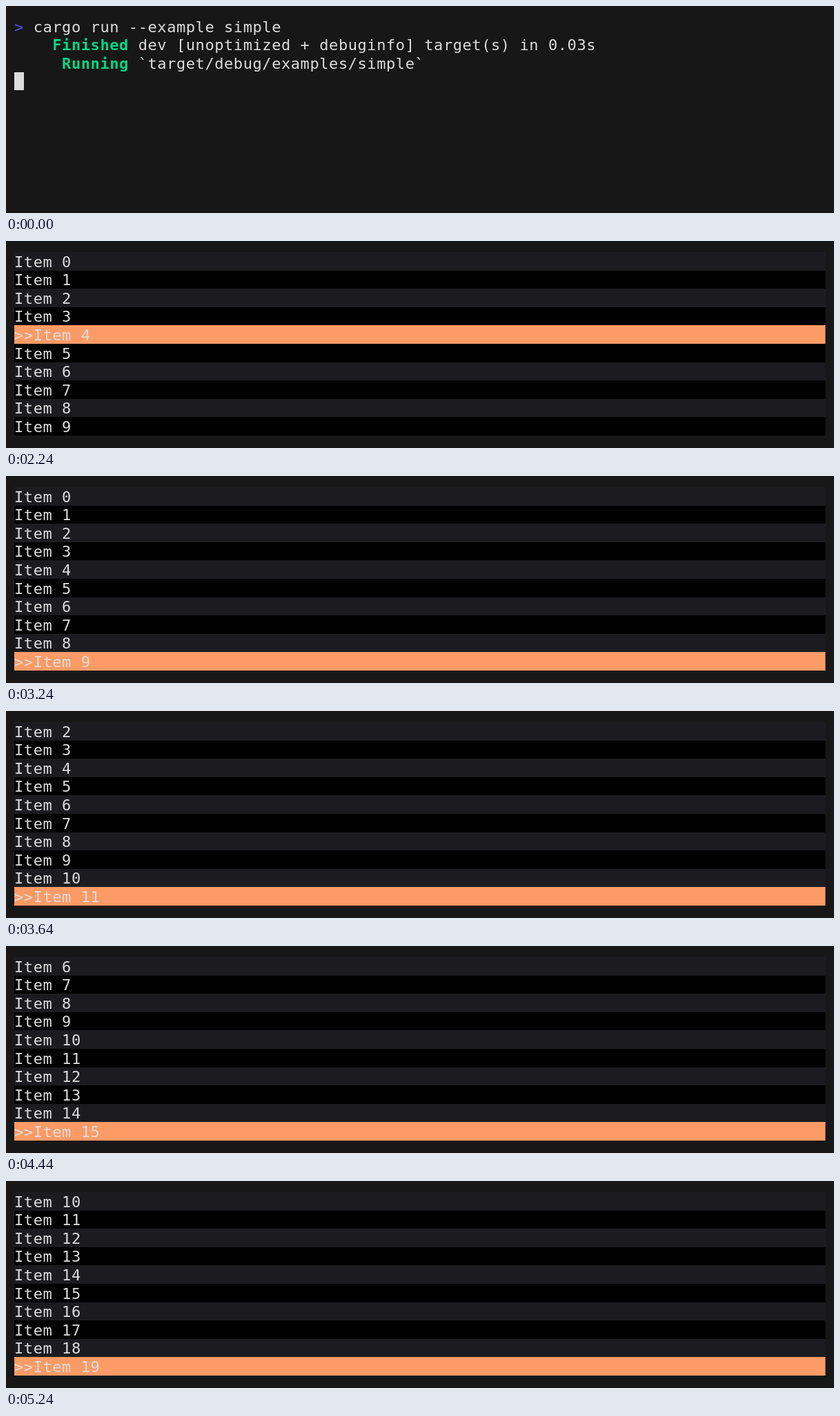
An HTML page that plays this animation: 1200x300 px, repeating every 6.88 s.

```html
<!DOCTYPE html>
<html lang="en">
<head>
<meta charset="utf-8">
<title>Terminal list</title>
<style>
html, body { margin: 0; width: 100%; height: 100%; overflow: hidden; background: #171717; }
svg { display: block; width: 1200px; height: 300px; }
text {
  font: 22px "DejaVu Sans Mono", "Noto Sans Mono", monospace;
  letter-spacing: .575px;
  white-space: pre;
  fill: #ddd;
}
.status { fill: #00d787; font-weight: bold; }
.prompt { fill: #5b56e0; }
</style>
</head>
<body>
<svg id="stage" viewBox="0 0 1200 300"></svg>
<script>
const LOOP = 6880, LIST_AT = 120, SELECT_AT = 1440, STEP = 200;
const ROWS = 10, LAST = 19, LEFT = 12, TOP = 16, LINE = 26.6;
const stage = document.getElementById("stage");

const rowTop = i => Math.round(TOP + i * LINE);
const bar = (i, width, fill) =>
  `<rect x="${LEFT}" y="${rowTop(i)}" width="${width}" height="${rowTop(i + 1) - rowTop(i)}" fill="${fill}"/>`;
const line = (i, content) =>
  `<text x="${LEFT}" y="${TOP + i * LINE + 21.5}">${content}</text>`;
const span = (cls, content) => `<tspan class="${cls}">${content}</tspan>`;

function shell() {
  return line(0, span("prompt", "&gt;") + " cargo run --example simple")
    + line(1, span("status", "    Finished") + " dev [unoptimized + debuginfo] target(s) in 0.03s")
    + line(2, span("status", "     Running") + " `target/debug/examples/simple`")
    + bar(3, 14, "#ddd");
}

function list(selected) {
  const first = Math.max(0, selected - ROWS + 1);
  let out = "";
  for (let i = 0; i < ROWS; i++) {
    const item = first + i, active = item === selected;
    out += bar(i, 1175.5, active ? "#fc9b66" : i % 2 ? "#000" : "#1c1c20")
      + line(i, (active ? "&gt;&gt;" : "") + "Item " + item);
  }
  return out;
}

// State -2 is the shell, -1 the list without a selection, then the selected item.
function stateAt(t) {
  if (t < LIST_AT) return -2;
  if (t < SELECT_AT) return -1;
  return Math.min(LAST, Math.floor((t - SELECT_AT) / STEP));
}

let shown = null;
const start = performance.now();
function draw() {
  const state = stateAt((performance.now() - start) % LOOP);
  if (state !== shown) {
    stage.innerHTML = state === -2 ? shell() : list(state);
    shown = state;
  }
  requestAnimationFrame(draw);
}
draw();
</script>
</body>
</html>
```
